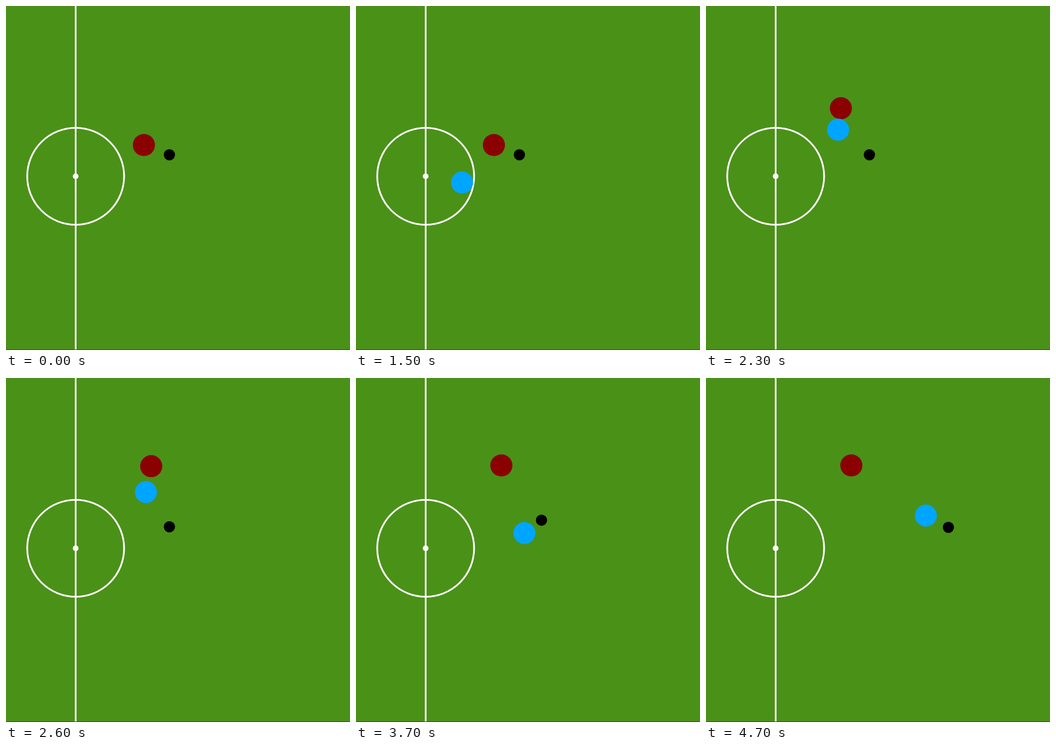
These frames come from a looping animation (600 px wide and 600 px high, 4800 ms). An HTML page:

```html
<!DOCTYPE html>
<html>
<head>
<meta charset="utf-8">
<style>
html, body { margin: 0; width: 100%; height: 100%; overflow: hidden; background: #4a9118; }
svg { display: block; width: 600px; height: 600px; }
.soft { filter: blur(.6px); }
</style>
</head>
<body>
<svg viewBox="0 0 600 600">
  <rect width="600" height="600" fill="#4a9118"/>
  <g class="soft">
    <g fill="none" stroke="#fff" stroke-width="3">
      <path d="M121.5 -5V605"/>
      <circle cx="121.5" cy="297" r="84.5"/>
    </g>
    <circle cx="121.5" cy="297" r="5" fill="#fff"/>
    <circle id="red" r="19.3" fill="#8b0000"/>
    <circle id="blue" r="19.2" fill="#00a5ff"/>
    <circle id="ball" r="9.8"/>
  </g>
  <rect y="599" width="600" height="1" fill="#2c560e"/>
</svg>
<script>
const STEP = 100, LOOP = 4800;

// Turning points and hits: [step, x, y]
const paths = {
  red: [[17.7, 240.5, 242.5], [19, 233, 212.5], [22, 231, 187], [26, 253.3, 153.8], [27, 253.5, 152.5]],
  blue: [[7, -25, 327], [11, 83, 324], [17, 229, 293], [19, 240, 249.5], [22, 228, 225], [26, 244, 199],
         [30, 244.3, 272], [34, 259, 270.5], [37, 293.7, 270.5], [42, 341, 229], [47, 383.5, 240]],
  ball: [[33.8, 285, 259.5], [37, 323.5, 248], [42.5, 374, 236], [47, 422.8, 260.5]]
};

const slope = (a, b, k) => (b[k] - a[k]) / (b[0] - a[0]);

// Smooth curve through the points, resting before the first and after the last
function position(path, step) {
  const last = path.length - 1;
  const s = Math.min(Math.max(step, path[0][0]), path[last][0]);
  const i = Math.max(path.findIndex(p => p[0] >= s) - 1, 0);
  const a = path[i], b = path[i + 1], h = b[0] - a[0], u = (s - a[0]) / h;
  const before = path[Math.max(i - 1, 0)], after = path[Math.min(i + 2, last)];
  return [1, 2].map(k => {
    const m = slope(before, b, k) * h, n = slope(a, after, k) * h, d = b[k] - a[k];
    return a[k] + u * (m + u * (3 * d - 2 * m - n + u * (m + n - 2 * d)));
  });
}

const start = performance.now();
function draw() {
  const step = Math.floor((performance.now() - start) % LOOP / STEP);
  for (const id in paths) {
    const [x, y] = position(paths[id], step);
    const disc = document.getElementById(id);
    disc.setAttribute("cx", x);
    disc.setAttribute("cy", y);
  }
  requestAnimationFrame(draw);
}
draw();
</script>
</body>
</html>
```
